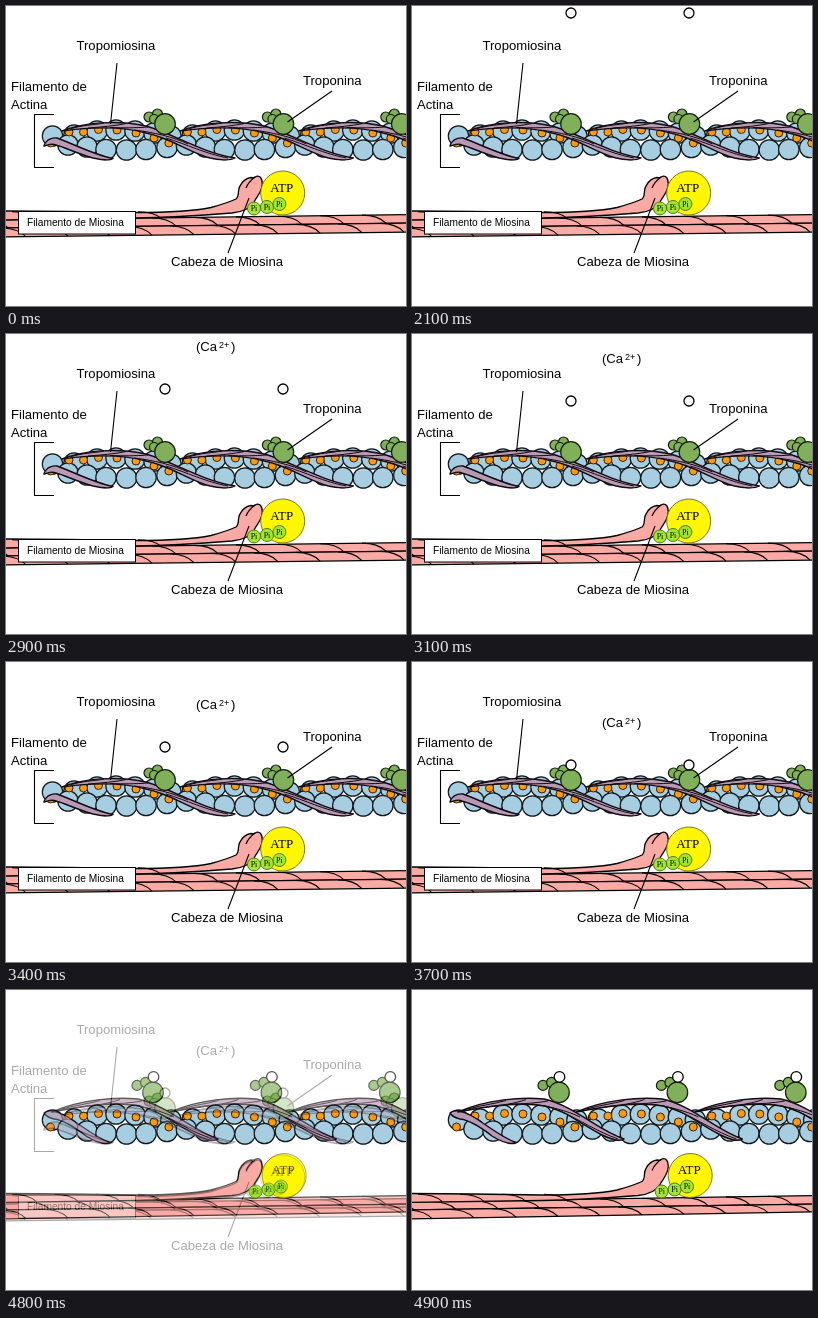
Recreate the animation shown at these times as an HTML page. Size 400 px wide and 300 px high, loop 6900 ms.

```html
<!DOCTYPE html>
<html lang="es">
<head>
<meta charset="utf-8">
<title>Contracción muscular</title>
<style>
html, body { margin: 0; width: 100%; height: 100%; overflow: hidden; background: #fff; }
svg { display: block; width: 100vw; height: 100vh; }
text { font: 13.1px "Liberation Sans", Arial, sans-serif; fill: #000; }
.small { font-size: 10.2px; }
.serif { font: 13px "Liberation Serif", "Times New Roman", serif; text-anchor: middle; }
.pi { font-size: 8px; }
.actin { fill: #a6cee0; stroke: #10181c; stroke-width: 1.2; }
.site { fill: #ff9a0c; stroke: #3a2000; stroke-width: 1; }
.rope { fill: #b99ab4; stroke: #120b11; stroke-width: 1.4; stroke-linejoin: round; }
.fold { fill: none; stroke: #120b11; stroke-width: 1; }
.trop { fill: #80b05a; stroke: #14200c; stroke-width: 1.2; }
.myosin { fill: #f9aaa4; stroke: #000; stroke-width: 1.3; stroke-linejoin: round; }
.scale, .line { fill: none; stroke: #000; stroke-width: 1.1; }
.atp { fill: #fff600; stroke: #6b6814; stroke-width: .9; }
.phos { fill: #a2e62e; stroke: #4c7a14; stroke-width: 1; }
.ion { fill: #fff; stroke: #000; stroke-width: 1.3; }
</style>
</head>
<body>
<svg viewBox="0 0 400 300" preserveAspectRatio="none">
  <g id="rest"></g>
  <g id="calcium">
    <circle class="ion" cx="159" r="5"/>
    <circle class="ion" cx="277" r="5"/>
    <g id="caLabel">
      <text x="190">(Ca</text>
      <text x="213" y="-3" style="font-size:9px">2+</text>
      <text x="225">)</text>
    </g>
  </g>
  <g id="active"></g>
</svg>
<script>
const LOOP = 6900, PERIOD = 118.4;
const $ = id => document.getElementById(id);
const circle = (cls, x, y, r) => `<circle class="${cls}" cx="${x}" cy="${y}" r="${r}"/>`;
const path = (cls, d) => `<path class="${cls}" d="${d}"/>`;
const text = (x, y, s, cls = "") => `<text class="${cls}" x="${x}" y="${y}">${s}</text>`;
const repeat = (n, fn) => Array.from({ length: n }, (_, i) => fn(i)).join("");
const shift = (k, body) => `<g transform="translate(${k * PERIOD})">${body}</g>`;

const lower = [[62, 139], [81, 141], [100, 143.5], [120.5, 144], [140, 143.5], [161, 141.5]];
const upper = [[46.5, 130], [68, 129], [91, 125], [110, 124], [129, 125], [148, 127]];
const sites = [[44.5, 137], [63, 126], [77.5, 126], [92.5, 123.5], [111, 124], [130, 127], [148, 132]];

const poses = {
  rest: {
    rope: "M56 125C78 116 112 114 140 120C168 128 194 146 229 152C224 155 212 154 204 152C180 145 165 132 140 127C115 120 85 121 56 125Z",
    fold: "M64 123C76 119 88 119 98 117M82 122C96 121 108 120 120 117.5M104 121.5C118 122 130 122 142 121M128 124C146 126 168 131 182 138M160 132C180 138 200 148 222 152",
    stub: "M38 140C39 135 45 131 51 132C63 136 88 149 107 152.5C104 155 96 154 87 152C70 147 58 141 50 139C46 137 42 139 38 140Z",
    trop: [159, 118], left: [214, 222, 231], right: [208.5, 217, 226],
    headY: 0, atp: [276.7, 187], atpText: 186, phos: [[248, 202.5], [261, 201], [273.4, 198]]
  },
  active: {
    rope: "M46 122C75 109 110 107 132 109C163 116 185 140 212 149C208 152 198 149 190 145C165 132 155 121 133 116C110 112 75 116 46 122Z",
    fold: "M56 119C70 115 82 114 94 110.5M74 117C90 115 102 114 114 109.5M98 114C112 114 124 113 136 111M120 114C136 116 156 121 168 127M150 122C166 129 186 142 206 149",
    stub: "M38 123C42 119 51 121 60 126C75 135 90 148 104 152.5C98 155 88 151 80 146C66 135 56 130 48 129C43 128 40 126 38 123Z",
    trop: [147, 102.4], ion: true, left: [212, 220, 229], right: [205.5, 214, 221.8],
    headY: -1.5, atp: [278.2, 185.5], atpText: 184, phos: [[249.6, 201.5], [262.6, 199.5], [275, 196.5]]
  }
};

function actin(p) {
  const balls = list => repeat(4, k => shift(k, list.map(([x, y]) => circle("actin", x, y, 10.2)).join("")));
  const dots = repeat(4, k => shift(k, sites.map(([x, y]) => circle("site", x, y, 4)).join("")));
  const ropes = path("rope", p.stub) + repeat(3, k => shift(k, path("rope", p.rope) + path("fold", p.fold)));
  const [x, y] = p.trop;
  const knob = circle("trop", x - 16, y - 7, 5) + circle("trop", x - 7.5, y - 10, 5) +
    (p.ion ? "" : circle("trop", x - 11, y - 5, 4.5)) +
    circle("trop", x, y, 10.3) + (p.ion ? circle("ion", x + .5, y - 15.5, 5.3) : "");
  return balls(upper) + balls(lower) + dots + ropes + repeat(3, k => shift(k, knob));
}

function myosin(p) {
  const at = (i, x) => p.left[i] + (p.right[i] - p.left[i]) * x / 400;
  const scale = (x, y, h) => path("scale", `M${x} ${y}Q${x + 16} ${y} ${x + 24} ${y + h}`);
  const band = i => path("myosin", `M-3 ${p.left[i]}L403 ${p.right[i]}V${p.right[i + 1]}L-3 ${p.left[i + 1]}Z`) +
    repeat(10, n => {
      const x = n * 42 - 22 + i * 18, y = at(i, x);
      return scale(x, y, at(i + 1, x + 24) - y);
    });
  const head = path("myosin", "M-3 205L60 205.5 130 206.5C165 206.5 188 205 205 201.5C214 199 224 196 230 193C234 190 231 184 234 180C237 174 241 172 245 171.5C247 172 248 172 249 171C254 168 257 173 256 180C255 187 251 190 248 196C244 203 236 206 226 207C200 209 160 211.5 130 212L-3 214Z") +
    path("scale", "M249 171C245 174 242 177 240 182") +
    repeat(4, n => scale(n * 42 + 6, 205.8, 7));
  return band(0) + band(1) + `<g transform="translate(0 ${p.headY})">${head}</g>` +
    circle("atp", ...p.atp, 22) + text(p.atp[0] - 1, p.atpText, "ATP", "serif") +
    p.phos.map(([x, y]) => circle("phos", x, y, 6.5) + text(x, y + 2.6, "Pi", "serif pi")).join("");
}

const labels =
  path("line", "M111 57L104.5 118M326 85L281.5 116M243 192L222 247M48 108.5H28.5V161.5H48") +
  `<rect x="12.5" y="205.5" width="117" height="22.5" fill="#fff" stroke="#000"/>` +
  text(21, 220, "Filamento de Miosina", "small") +
  text(70.5, 44, "Tropomiosina") + text(297, 79, "Troponina") +
  text(5, 85, "Filamento de") + text(5, 103, "Actina") + text(165, 259.5, "Cabeza de Miosina");

$("rest").innerHTML = actin(poses.rest) + myosin(poses.rest) + labels;
$("active").innerHTML = `<rect width="400" height="300" fill="#fff"/>` + actin(poses.active) + myosin(poses.active);

const ions = document.querySelectorAll("#calcium > circle");
const start = performance.now();

function draw() {
  const tick = Math.floor((performance.now() - start) % LOOP / 100);
  // Calcium sinks 6 px per tick, then the active pose fades in over three ticks.
  const y = 7 + 6 * (Math.min(tick, 37) - 21);
  $("calcium").style.display = tick < 21 ? "none" : "";
  ions.forEach(c => c.setAttribute("cy", y));
  $("caLabel").setAttribute("transform", `translate(0 ${y - 38})`);
  $("active").style.opacity = Math.max(0, Math.min(1, (tick - 46) / 3));
  requestAnimationFrame(draw);
}
draw();
</script>
</body>
</html>
```
